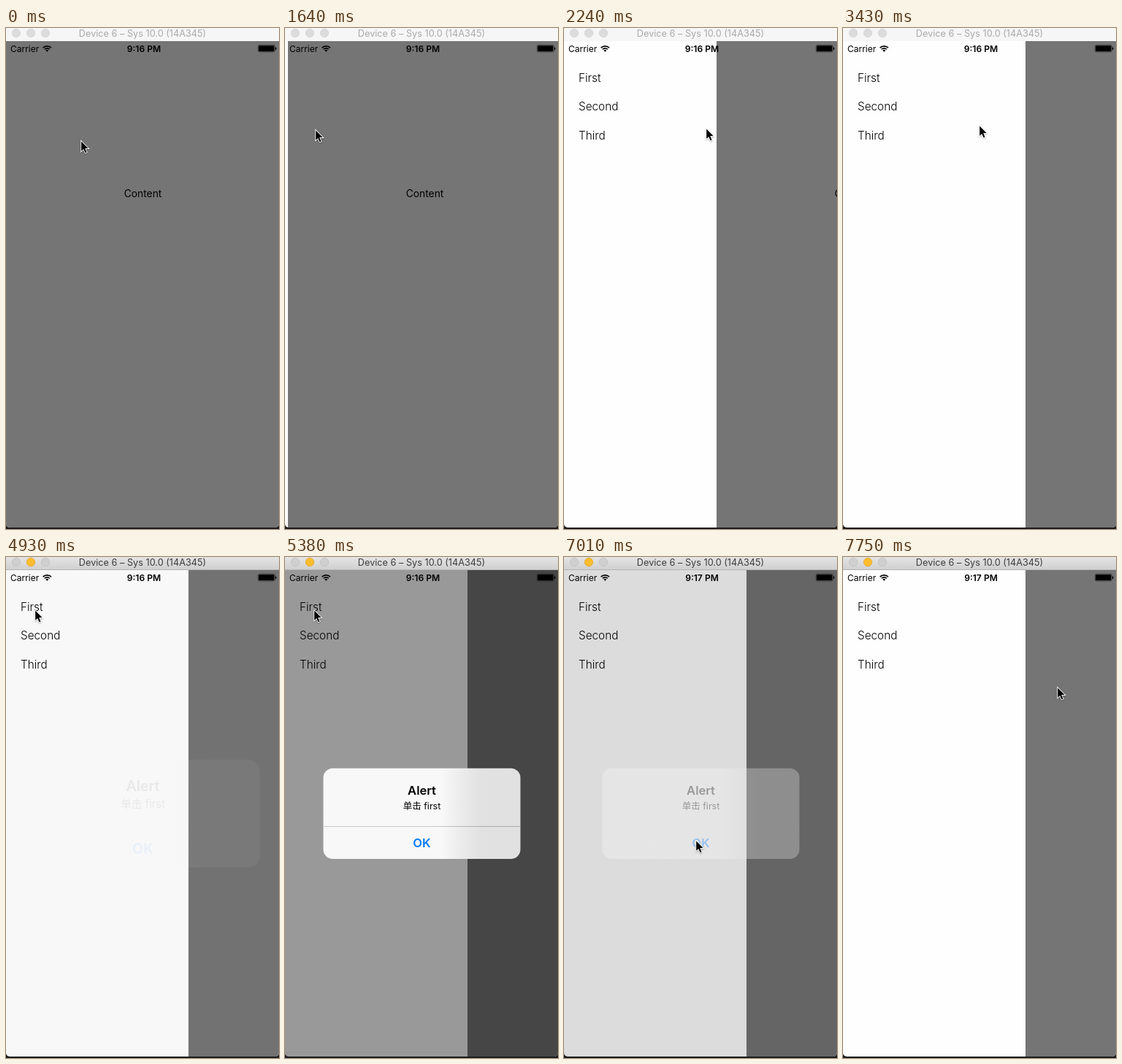
Animation of 374x687 px, one loop 8000 ms. Source, as an HTML page with a canvas:

```html
<!DOCTYPE html>
<html lang="en">
<head>
<meta charset="utf-8">
<title>Side menu</title>
<style>
  html, body { margin: 0; width: 100%; height: 100%; overflow: hidden; background: #1c1c1e; }
  canvas { display: block; width: 374px; height: 687px; }
</style>
</head>
<body>
<canvas id="stage" width="374" height="687"></canvas>
<script>
const W = 374, H = 687, BAR = 18, FLOOR = 685;
const LOOP = 8000, STEP = 149;
const MENU_WIDTH = 250;
const ctx = document.getElementById('stage').getContext('2d');
const FONT = 'Inter, "Noto Sans CJK SC", "Noto Sans CJK", sans-serif';

const HOME = { x: 102, y: 154 };
const MOVES = [
  { from: 0, to: 890, x: 12, y: 139 },
  { from: 1440, to: 2230, x: 194, y: 137 },
  { from: 3280, to: 4320, x: 39, y: 72 },
  { from: 5520, to: 6700, x: 180, y: 388 },
  { from: 7090, to: 7740, x: 293, y: 178 }
];

// Smooth 0 to 1 between two times.
function ease(t, from, to) {
  const p = Math.min(1, Math.max(0, (t - from) / (to - from)));
  return p * p * (3 - 2 * p);
}

function pointerAt(t) {
  let { x, y } = HOME;
  for (const move of MOVES) {
    const p = ease(t, move.from, move.to);
    x += (move.x - x) * p;
    y += (move.y - y) * p;
  }
  return [Math.round(x), Math.round(y)];
}

function rect(x, y, w, h, color) {
  ctx.fillStyle = color;
  ctx.fillRect(x, y, w, h);
}

function text(str, x, y, size, { color = '#000', weight = 400, align = 'left' } = {}) {
  ctx.font = `${weight} ${size}px ${FONT}`;
  ctx.fillStyle = color;
  ctx.textAlign = align;
  ctx.fillText(str, x, y);
}

function rounded(x, y, w, h, r) {
  ctx.beginPath();
  ctx.roundRect(x, y, w, h, r);
}

function gradient(x0, y0, x1, y1, ...colors) {
  const g = ctx.createLinearGradient(x0, y0, x1, y1);
  colors.forEach((color, i) => g.addColorStop(i / (colors.length - 1), color));
  return g;
}

function drawTitleBar(active) {
  rect(0, 0, W, BAR, active ? gradient(0, 0, 0, BAR, '#e4e4e4', '#cfcfcf') : '#f6f6f6');
  if (active) rect(0, BAR - 1, W, 1, '#b4b4b4');
  for (let i = 0; i < 3; i++) {
    const yellow = active && i === 1;
    ctx.beginPath();
    ctx.arc(14 + 20 * i, 7, 5.7, 0, Math.PI * 2);
    ctx.fillStyle = yellow ? '#ffbd2e' : active ? '#cfcfcf' : '#dcdcdc';
    ctx.fill();
    ctx.strokeStyle = yellow ? '#e0a028' : active ? '#bdbdbd' : '#d2d2d2';
    ctx.lineWidth = 0.7;
    ctx.stroke();
  }
  text('Device 6 – Sys 10.0 (14A345)', 187, 12, 12.7,
    { color: active ? '#3c3c3c' : '#a9a9a9', align: 'center' });
}

function drawStatus(clock) {
  text('Carrier', 6, 32.5, 12);
  text(clock, 189, 32.5, 12.1, { weight: 600, align: 'center' });

  ctx.strokeStyle = ctx.fillStyle = '#000';
  ctx.lineWidth = 1.7;
  const from = -Math.PI * 0.75, to = -Math.PI * 0.25;
  for (const r of [5, 8]) {
    ctx.beginPath();
    ctx.arc(56.3, 32.8, r, from, to);
    ctx.stroke();
  }
  ctx.beginPath();
  ctx.moveTo(56.3, 32.8);
  ctx.arc(56.3, 32.8, 2.8, from, to);
  ctx.fill();

  ctx.lineWidth = 0.5;
  rounded(345.3, 23.3, 23, 9.6, 2);
  ctx.stroke();
  rounded(346.2, 24.2, 21.2, 7.8, 1.2);
  ctx.fill();
  rounded(369, 26.5, 1.3, 3.4, 0.7);
  ctx.fill();
}

function drawAlert(alpha, scale) {
  const cx = 187.5, cy = 352;
  ctx.save();
  ctx.globalAlpha = alpha;
  ctx.translate(cx, cy);
  ctx.scale(scale, scale);
  ctx.translate(-cx, -cy);
  ctx.fillStyle = gradient(215, 0, 270, 0, '#f8f8f8', '#ebebeb', '#e1e1e1');
  rounded(52.5, 289.7, 270, 124.3, 13);
  ctx.fill();
  if (alpha > 0.5) rect(52.5, 369, 270, 1, gradient(200, 0, 270, 0, '#c8c8c8', '#a9a9a9'));
  text('Alert', cx, 325.7, 16.5, { weight: 600, align: 'center' });
  text('单击 first', cx, 345.5, 12.5, { align: 'center' });
  text('OK', cx, 398, 16.5, { weight: 600, color: '#007aff', align: 'center' });
  ctx.restore();
}

function drawPointer(x, y) {
  ctx.save();
  ctx.translate(x + 0.5, y);
  ctx.beginPath();
  [[0.7, 1.4], [0.7, 14.8], [3.7, 11.9], [6.1, 17.2], [8, 16.4], [5.7, 11.1], [10.1, 11.1]]
    .forEach(([px, py]) => ctx.lineTo(px, py));
  ctx.closePath();
  ctx.shadowColor = 'rgba(0,0,0,.3)';
  ctx.shadowBlur = 2;
  ctx.shadowOffsetY = 1;
  ctx.lineWidth = 1.8;
  ctx.strokeStyle = '#fff';
  ctx.stroke();
  ctx.shadowColor = 'transparent';
  ctx.fillStyle = '#000';
  ctx.fill();
  ctx.restore();
}

function draw(t) {
  const drawer = Math.round(MENU_WIDTH * ease(t, 1570, 2465));
  const opening = ease(t, 4850, 5290);
  const shown = opening - ease(t, 6823, 7116);

  rect(0, 0, W, H, '#1c1c1e');
  ctx.save();
  rounded(0, 0, W, FLOOR, [0, 0, 5, 5]);
  ctx.clip();
  rect(0, BAR, W, FLOOR - BAR, '#fefefe');
  ['First', 'Second', 'Third'].forEach((label, i) =>
    text(label, 20, 73.5 + i * 39.5, 15.3, { weight: 300 }));
  rect(drawer, BAR, W, FLOOR - BAR, '#757575');
  text('Content', 187.5 + drawer, 231.5, 13.8, { align: 'center' });
  if (shown > 0) {
    rect(0, BAR, W, FLOOR - BAR, `rgba(0,0,0,${0.4 * shown})`);
    drawAlert(shown, 1.2 - 0.2 * opening);
  }
  drawStatus(t < 6850 ? '9:16 PM' : '9:17 PM');
  drawTitleBar(t > 4900);
  ctx.restore();
  drawPointer(...pointerAt(t));
}

const began = performance.now();
function tick() {
  const t = (performance.now() - began) % LOOP;
  draw(Math.floor((t + 9) / STEP) * STEP);
  requestAnimationFrame(tick);
}
tick();
</script>
</body>
</html>
```
